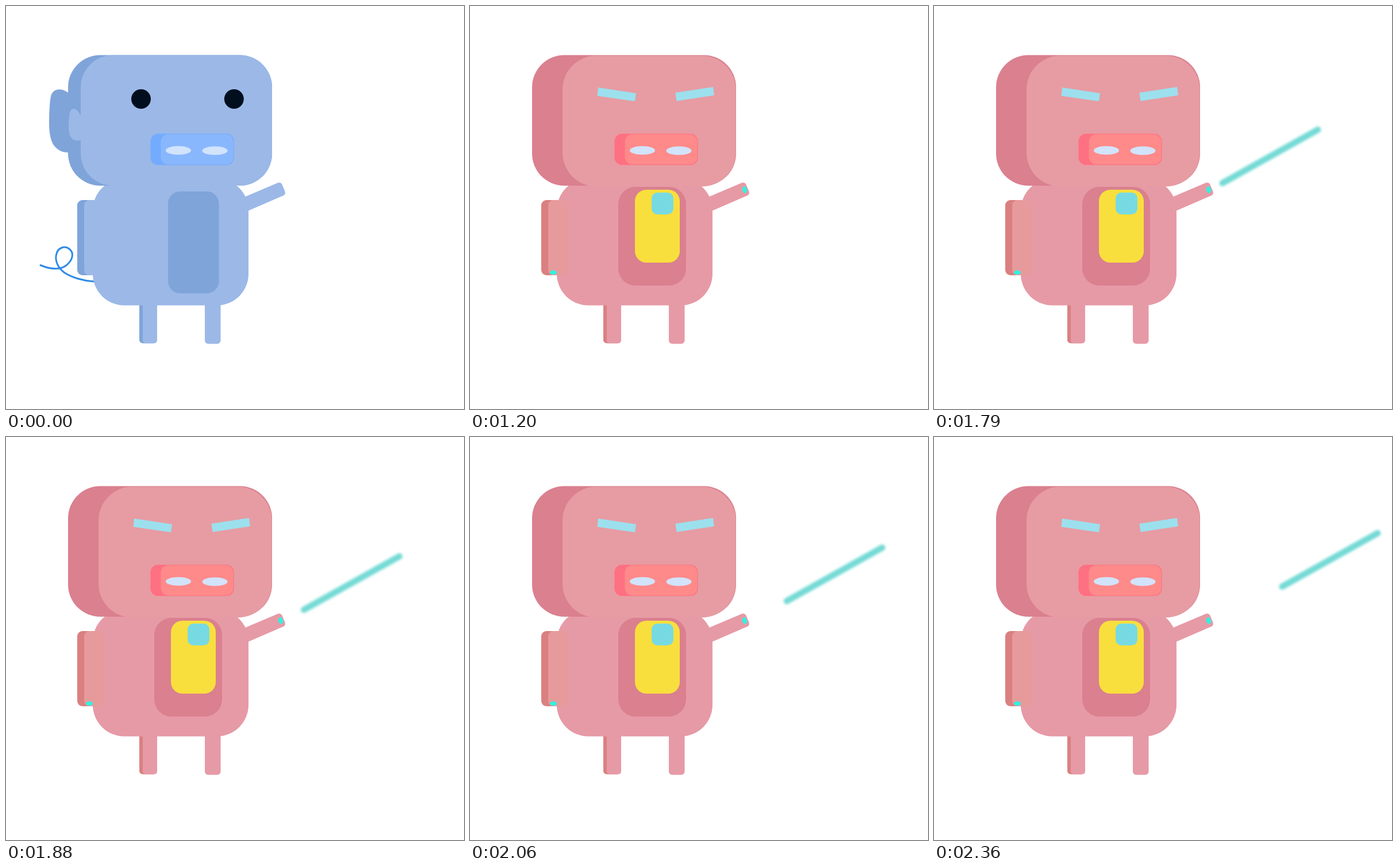
These frames come from a looping animation (797x702 px, 2660 ms). An HTML page:

```html
<!DOCTYPE html>
<html lang="en">
<head>
<meta charset="utf-8">
<title>Robot transformation</title>
<style>
  html, body { margin: 0; width: 100%; height: 100%; overflow: hidden; background: #fff; }
  svg { display: block; width: 797px; height: 702px; }

  .blue { --light: #9bb8e7; --dark: #7fa4d9; --arm: #9bb8e7; --edge: #7fa4d9; --snout: #89b7fe; --snout-edge: #73acfe; }
  .pink { --light: #e69aa6; --dark: #da808f; --arm: #e69a9b; --edge: #da8080; --snout: #ff8a8a; --snout-edge: #ff7082; }
  .light { fill: var(--light); }
  .dark { fill: var(--dark); }
  .arm { fill: var(--arm); }
  .edge { fill: var(--edge); }
  .snout { fill: var(--snout); }
  .snout-edge { fill: var(--snout-edge); }

  /* Loop: 500 ms body, 1200 ms head, 1730 ms beam */
  .blue-body, .blue-head, .pink-body, .pink-head, .beam { animation: 2660ms step-end infinite; }
  .blue-body { animation-name: body-out; }
  .blue-head { animation-name: head-out; }
  .pink-body { animation-name: body-in; }
  .pink-head { animation-name: head-in; }
  .beam { animation-name: beam-in; }
  .shot { animation: fly 2660ms linear infinite; }

  @keyframes body-out { 0% { opacity: 1; } 18.795%, 100% { opacity: 0; } }
  @keyframes body-in { 0% { opacity: 0; } 18.795%, 100% { opacity: 1; } }
  @keyframes head-out { 0% { opacity: 1; } 45.11%, 100% { opacity: 0; } }
  @keyframes head-in { 0% { opacity: 0; } 45.11%, 100% { opacity: 1; } }
  @keyframes beam-in { 0% { opacity: 0; } 65.036%, 100% { opacity: 1; } }
  /* 22 positions, 30 ms apart */
  @keyframes fly {
    0% { transform: translate(0, 0); }
    65.036% { transform: translate(0, 0); animation-timing-function: steps(22, jump-none); }
    89.848%, 100% { transform: translate(115px, -53px); }
  }
</style>
</head>
<body>
<svg viewBox="0 0 797 702">
  <defs>
    <g id="body">
      <path class="light" d="M400 339L473 308Q478 306 480.500 311L485.500 323Q487 328 483 330L400 366Z"/>
      <rect class="edge" x="232" y="500" width="30" height="87.500" rx="6"/>
      <rect class="light" x="238" y="500" width="25" height="87.500" rx="5"/>
      <rect class="light" x="346" y="500" width="27.500" height="88.500" rx="6"/>
      <rect class="light" x="151" y="301" width="271" height="220.500" rx="55"/>
      <rect class="edge" x="124" y="338" width="40" height="131" rx="9"/>
      <rect class="arm" x="136" y="338" width="34" height="131" rx="9"/>
    </g>
    <rect id="skull" class="dark" x="108" y="85.500" width="355" height="227.500" rx="56"/>
    <g id="nose">
      <rect class="snout-edge" x="251.500" y="222.500" width="145" height="54.500" rx="13"/>
      <rect class="snout" x="269.500" y="223.500" width="126" height="52.500" rx="13"/>
      <g fill="#d2e3fc">
        <ellipse cx="300" cy="251.500" rx="22" ry="7.500"/>
        <ellipse cx="363.500" cy="252" rx="22" ry="7.500"/>
      </g>
    </g>
    <filter id="glow" filterUnits="userSpaceOnUse" x="460" y="190" width="230" height="160" color-interpolation-filters="sRGB">
      <feGaussianBlur stdDeviation="2.300"/>
    </filter>
  </defs>

  <g class="blue blue-body">
    <path d="M60 451.500C78 459 97 461 108 449C117 440 118 429 110 423C102 417 91 421 88 431C84 444 91 456 101 464C114 473 135 479 154 480" fill="none" stroke="#2e8ae6" stroke-width="3" stroke-linecap="round"/>
    <use href="#body"/>
    <rect class="dark" x="282" y="323" width="88.500" height="177.500" rx="21"/>
  </g>

  <g class="blue blue-head">
    <use href="#skull"/>
    <path class="dark" d="M114 157C104 144 86 140 79 154C76 162 75 188 75 203C75 223 78 238 86 246C94 254 103 256 114 255Z"/>
    <path class="light" d="M133 198C128 184 121 176 114 180C109 185 109 203 109 213C110 233 119 237 133 233Z"/>
    <rect class="light" x="130" y="85.500" width="333" height="227.500" rx="56"/>
    <g fill="#010e1e">
      <circle cx="235" cy="162" r="17"/>
      <circle cx="396.800" cy="162" r="17"/>
    </g>
    <use href="#nose"/>
  </g>

  <g class="pink pink-body">
    <use href="#body"/>
    <rect class="dark" x="258" y="315" width="118" height="172" rx="30"/>
    <rect x="287" y="320" width="78" height="127" rx="20" fill="#f9df3d"/>
    <rect x="316" y="325" width="38" height="38" rx="10" fill="#77dae2"/>
  </g>

  <g class="pink pink-head">
    <use href="#skull"/>
    <rect x="161" y="86.500" width="301.500" height="228" rx="59" fill="#e69ca2"/>
    <path d="M223 142L289 152L287 166L221.500 156.500ZM357.500 151L423 141L425 155.500L359.500 165.500Z" fill="#9ce0ee"/>
    <use href="#nose"/>
    <g fill="#2ff3df">
      <ellipse cx="478" cy="320" rx="4" ry="6" transform="rotate(-15 478 320)"/>
      <ellipse cx="145" cy="464.300" rx="6" ry="3.700"/>
    </g>
  </g>

  <g class="beam">
    <g class="shot">
      <path d="M491 313.500L657 220.500" fill="none" stroke="#74dad5" stroke-width="11" stroke-linecap="round" filter="url(#glow)"/>
    </g>
  </g>
</svg>
</body>
</html>
```
